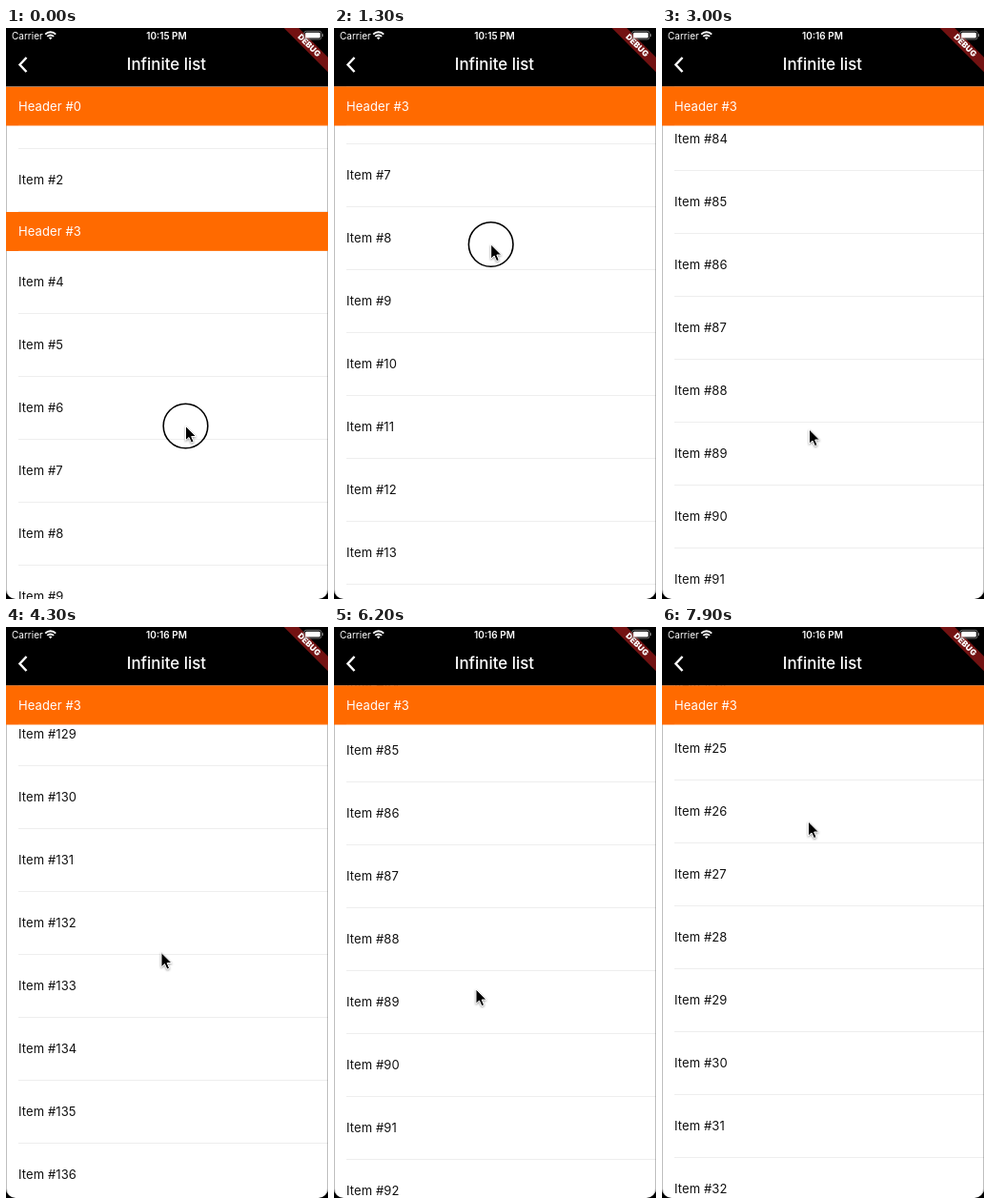
These frames come from a looping animation (338 by 599 pixels, 8 s). An HTML page:

```html
<!DOCTYPE html>
<html lang="en">
<head>
<meta charset="utf-8">
<title>Infinite list</title>
<style>
  html, body { margin: 0; width: 100%; height: 100%; overflow: hidden; background: #000; }
  #stage { position: relative; width: 338px; height: 599px; overflow: hidden; background: #000;
    font: 13px/1 Inter, Roboto, sans-serif; color: #111; }
  #list { position: absolute; inset: 0; background: #fff; clip-path: inset(61.5px 0 0 round 0 0 10px 10px);
    letter-spacing: .1px; }
  #list::before { content: ""; position: absolute; inset: 0; z-index: 1; border: solid rgba(0,0,0,.25);
    border-width: 0 1px; border-radius: 0 0 10px 10px; }
  .item, .header { position: absolute; top: 0; left: 0; width: 100%; box-sizing: border-box; padding-left: 13px;
    white-space: pre; }
  .item { height: 66px; line-height: 65px; }
  .item::after, .header::after { content: ""; position: absolute; left: 13px; right: 0; bottom: 0; height: 1px;
    background: #eee; }
  .header { height: 40.5px; line-height: 41px; background: #ff6a00; color: #fff; z-index: 2; }
  .header::after { background: rgba(255,255,255,.12); }
  .bar { position: absolute; color: #fff; white-space: pre; }
  #carrier { left: 6px; top: 3px; font-size: 10px; }
  #clock { left: 0; width: 337px; top: 3px; font-size: 10px; font-weight: 600; text-align: center; }
  #title { left: 0; width: 337px; top: 30px; font-size: 16.9px; font-weight: 500; text-align: center; }
  #banner { position: absolute; left: 277.5px; top: 13px; width: 80px; height: 11px; transform: rotate(45deg);
    background: #731212; color: #fff; font: 900 8.5px/11px Inter, Roboto, sans-serif; text-align: center; }
  svg { position: absolute; left: 0; top: 0; overflow: visible; }
</style>
</head>
<body>
<div id="stage">
  <div id="list"></div>
  <div class="bar" id="carrier">Carrier</div>
  <div class="bar" id="clock"></div>
  <div class="bar" id="title">Infinite list</div>
  <div id="banner">DEBUG</div>
  <svg width="338" height="599" fill="none">
    <g stroke="#fff" stroke-width="1.9">
      <path d="M41.2 6.6a7.6 7.6 0 0 1 11 0"/>
      <path d="M43.3 8.9a4.8 4.8 0 0 1 6.8 0"/>
    </g>
    <path d="M44.9 10.3a2.6 2.6 0 0 1 3.6 0L46.7 12.2z" fill="#fff"/>
    <path d="M21.5 31L14.5 38.5l7 7.5" stroke="#fff" stroke-width="2.4"/>
    <rect x="312.8" y="3.3" width="18.4" height="8.6" rx="2.4" stroke="#8a8a8a" stroke-width=".8"/>
    <rect x="314.2" y="4.7" width="15.6" height="5.8" rx="1.3" fill="#fff"/>
    <path d="M332.4 6.2v2.8" stroke="#8a8a8a"/>
    <g id="pointer">
      <circle id="touch" r="23.3" stroke="#000" stroke-width="1.6"/>
      <path d="M0 0V15.2L3.5 12L6 17.6L8.6 16.5L6.2 11H11z" fill="#000" stroke="#fff" stroke-width="1"
        style="filter:drop-shadow(0 1px 1.2px rgba(0,0,0,.4))"/>
    </g>
  </svg>
</div>
<script>
const LOOP = 8000, STEP = 100;
const ROW = 66, HEAD = 40.5, TOP = 61.5, POOL = 12;
const FLICK_START = 3000, FLICK_REACH = 180, TOUCH_SPEED = 9;

// Poses the motion passes through; scrolling reverses at the peak
const poses = [
  { at: 0, scroll: 0, x: 188.5, y: 417.5 },
  { at: 900, scroll: 102, x: 171.5, y: 324.5 },
  { at: 1900, scroll: 1018, x: 157.5, y: 105 },
  { at: 3000, scroll: 5430, x: 154.5, y: 421 },
  { at: 4300, scroll: 8404, x: 163, y: 341.5 },
  { at: 4650, scroll: 8500, x: 162, y: 350 },
  { at: 6200, scroll: 5483, x: 149, y: 380 },
  { at: 7900, scroll: 1525, x: 153.5, y: 204 }
];
const last = poses.length - 1;

const $ = id => document.getElementById(id);

function segment(t) {
  let i = 0;
  while (i < last - 1 && t >= poses[i + 1].at) i++;
  const span = poses[i + 1].at - poses[i].at;
  return { i, span, u: (t - poses[i].at) / span };
}

// Smooth path through the poses that never overshoots them
function glide(key, t) {
  const slope = i => (poses[i + 1][key] - poses[i][key]) / (poses[i + 1].at - poses[i].at);
  const tangent = i => {
    const a = slope(Math.max(i - 1, 0)), b = slope(Math.min(i, last - 1));
    return a * b <= 0 ? 0 : 2 * a * b / (a + b);
  };
  const { i, span, u } = segment(t), v = 1 - u;
  return poses[i][key] * (1 + 2 * u) * v * v + poses[i + 1][key] * u * u * (3 - 2 * u)
    + span * u * v * (tangent(i) * v - tangent(i + 1) * u);
}

// The later flicks swing the pointer up and back between poses
function pointerY(t) {
  const swing = t > FLICK_START ? Math.sin(Math.PI * segment(t).u) ** 2 : 0;
  return glide("y", t) - FLICK_REACH * swing;
}

// A finger is down while the pointer drags the content along
function isTouching(t) {
  const dy = pointerY(t) - pointerY(t - STEP);
  const ds = glide("scroll", t) - glide("scroll", t - STEP);
  return dy * ds < 0 && Math.abs(dy) > TOUCH_SPEED;
}

function addRow(type, text = "") {
  const el = document.createElement("div");
  el.className = type;
  el.textContent = text;
  $("list").append(el);
  return el;
}

const place = (el, y) => { el.style.transform = `translateY(${y}px)`; };
const rows = Array.from({ length: POOL }, () => addRow("item"));
const firstHeader = addRow("header", "Header #0");
const nextHeader = addRow("header", "Header #3");

const nextTop = 61 + 2 * ROW;
const bodyTop = nextTop + 41;
const itemTop = n => n < 3 ? nextTop + (n - 3) * ROW : bodyTop + (n - 4) * ROW;

function draw(t) {
  const offset = Math.round(glide("scroll", t));
  const past = offset + TOP - bodyTop;
  const first = past < 0 ? 1 : 4 + Math.floor(past / ROW);

  rows.forEach((row, k) => {
    const n = first + k;
    row.style.display = n === 3 ? "none" : "";
    row.textContent = "Item #" + n;
    place(row, itemTop(n) - offset);
  });

  const top = Math.max(TOP, nextTop - offset);
  place(nextHeader, top);
  place(firstHeader, Math.min(TOP, top - HEAD));

  $("clock").textContent = t < 2400 ? "10:15 PM" : "10:16 PM";
  $("pointer").setAttribute("transform", `translate(${glide("x", t)} ${pointerY(t)})`);
  $("touch").style.display = isTouching(t) ? "" : "none";
}

const start = performance.now();
function tick() {
  const t = (performance.now() - start) % LOOP;
  draw(Math.floor(t / STEP) * STEP);
  requestAnimationFrame(tick);
}
tick();
</script>
</body>
</html>
```
